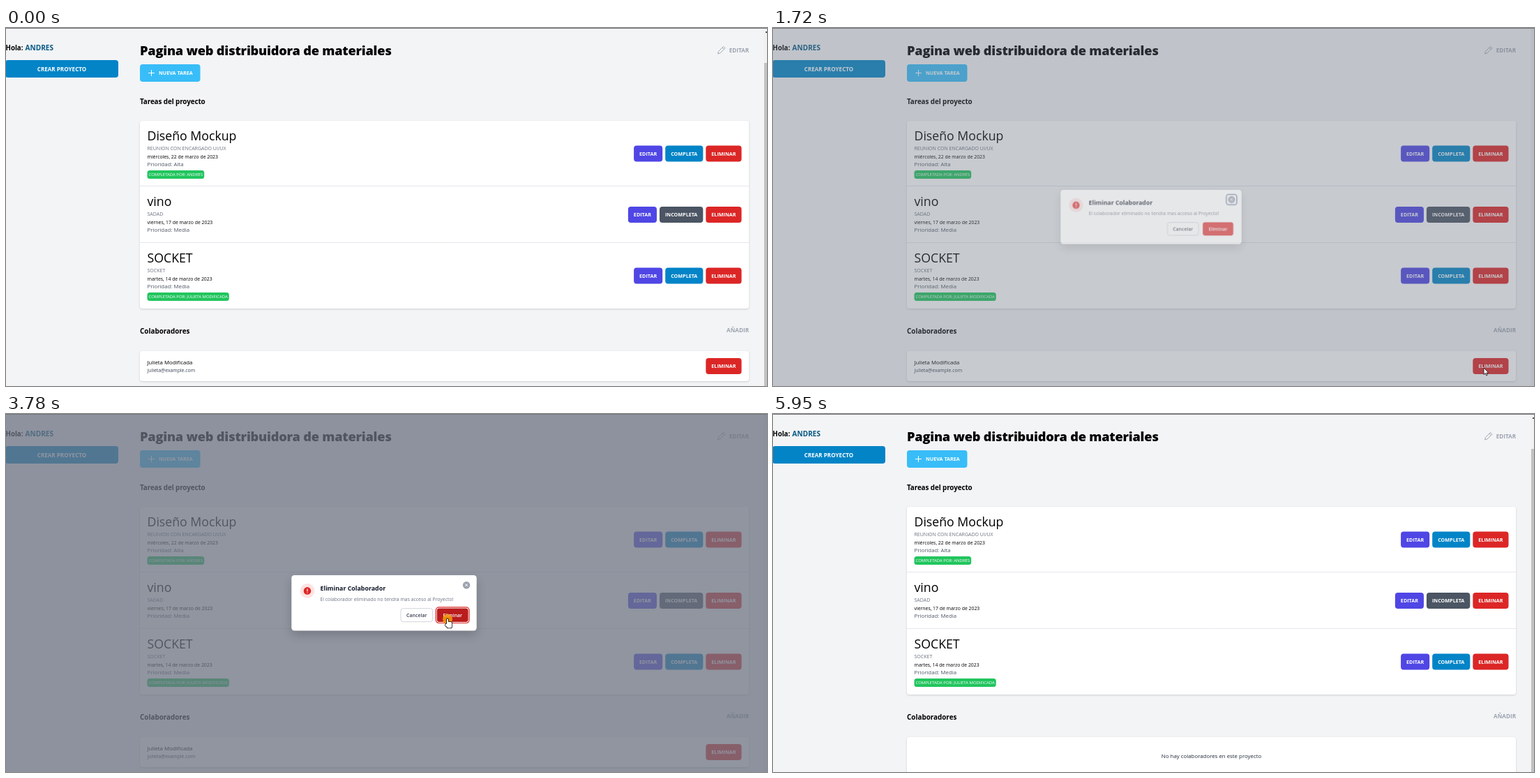
Recreate the animation shown at these times as an HTML page with a canvas. Size 1091x513 px, loop 6880 ms.

```html
<!DOCTYPE html>
<html lang="es">
<head>
<meta charset="utf-8">
<title>Tareas del proyecto</title>
<style>
  html, body { margin: 0; width: 100%; height: 100%; overflow: hidden; background: #f3f4f6; }
  canvas { display: block; }
</style>
</head>
<body>
<canvas id="stage" width="1091" height="513"></canvas>
<script>
const W = 1091, H = 513, LOOP = 6880;
const screen2d = document.getElementById('stage').getContext('2d');
const layer = document.createElement('canvas');
layer.width = W;
layer.height = H;
const layer2d = layer.getContext('2d');
let ctx = screen2d;

const RED = '#dc2626', SKY = '#0284c7', INDIGO = '#4f46e5', SLATE = '#4b5563';
const GREY = '#6b7280', PALE = '#9ca3af';
const LEFT = 192, RIGHT = 1065, INSET = 10.5;
const USER = 'ANDRES', PARTNER = 'Julieta Modificada', MAIL = 'julieta@example.com';

const TASKS = [
  { name: 'Diseño Mockup', detail: 'REUNION CON ENCARGADO UI/UX', date: 'miércoles, 22 de marzo de 2023', priority: 'Alta', doneBy: USER },
  { name: 'vino', detail: 'SADAD', date: 'viernes, 17 de marzo de 2023', priority: 'Media' },
  { name: 'SOCKET', detail: 'SOCKET', date: 'martes, 14 de marzo de 2023', priority: 'Media', doneBy: PARTNER.toUpperCase() }
];

// Moments of the story, in ms.
const ENTER = 130, LOCK = 1640, OPEN = 1645, PRESS = 3760, CLOSE = 4040, UNLOCK = 4150, LEAVE = 5930;

// The pointer glides to each stop and rests there until the next one.
const START = { x: 953, y: 356 };
const STOPS = [
  { from: ENTER, to: 450, x: 1049, y: 490 },
  { from: 450, to: 760, x: 980, y: 437 },
  { from: 830, to: 1180, x: 1019, y: 487 },
  { from: 1730, to: 2260, x: 764, y: 387 },
  { from: 2330, to: 2950, x: 645, y: 337 },
  { from: 3030, to: 3370, x: 633, y: 293 },
  { from: 3800, to: UNLOCK, x: 636, y: 296 },
  { from: 4640, to: 5320, x: 888, y: 458 },
  { from: 5380, to: LEAVE, x: 1078, y: 513 }
];

const snap = t => ENTER + Math.floor((t - ENTER) / 66) * 66;
const clamp = k => Math.max(0, Math.min(1, k));

// Cubic Bezier easing with control heights 0 and 1.
function ease(x, x1, x2) {
  if (x <= 0) return 0;
  if (x >= 1) return 1;
  let low = 0, high = 1, u = 0.5;
  for (let i = 0; i < 20; i++) {
    u = (low + high) / 2;
    const at = 3 * u * (1 - u) ** 2 * x1 + 3 * u * u * (1 - u) * x2 + u ** 3;
    if (at < x) low = u; else high = u;
  }
  return u * u * (3 - 2 * u);
}

function pointerAt(t) {
  return STOPS.reduce((p, stop) => {
    const k = 1 - (1 - clamp((t - stop.from) / (stop.to - stop.from))) ** 2.5;
    return { x: p.x + (stop.x - p.x) * k, y: p.y + (stop.y - p.y) * k };
  }, START);
}

const inside = (p, x, y, w, h) => p.x >= x && p.x <= x + w && p.y >= y && p.y <= y + h;

function setFont(size, weight, spacing = 0) {
  ctx.font = `${weight} ${size}px "Open Sans", "Noto Sans", sans-serif`;
  ctx.letterSpacing = `${spacing * size}px`;
}

function text(str, x, y, size, color, weight = 400, align = 'left', spacing = 0) {
  setFont(size, weight, spacing);
  ctx.textAlign = align;
  ctx.fillStyle = color;
  ctx.fillText(str, x, y);
}

function textWidth(str, size, weight) {
  setFont(size, weight);
  return ctx.measureText(str).width;
}

function box(x, y, w, h, r, fill, stroke, width = 1) {
  ctx.beginPath();
  ctx.roundRect(x, y, w, h, r);
  if (fill) { ctx.fillStyle = fill; ctx.fill(); }
  if (stroke) { ctx.strokeStyle = stroke; ctx.lineWidth = width; ctx.stroke(); }
}

function disc(x, y, r, fill) {
  box(x - r, y - r, 2 * r, 2 * r, r, fill);
}

function rect(x, y, w, h, fill) {
  ctx.fillStyle = fill;
  ctx.fillRect(x, y, w, h);
}

function line(x1, y1, x2, y2, color, width = 1) {
  ctx.beginPath();
  ctx.moveTo(x1, y1);
  ctx.lineTo(x2, y2);
  ctx.strokeStyle = color;
  ctx.lineWidth = width;
  ctx.stroke();
}

// Two crossed strokes: a plus, or a cross when turned by 45 degrees.
function cross(x, y, r, angle) {
  for (const a of [angle, angle + Math.PI / 2]) {
    const dx = r * Math.cos(a), dy = r * Math.sin(a);
    line(x - dx, y - dy, x + dx, y + dy, '#fff');
  }
}

function shadowed(blur, dy, color, draw) {
  ctx.save();
  ctx.shadowBlur = blur;
  ctx.shadowOffsetY = dy;
  ctx.shadowColor = color;
  draw();
  ctx.restore();
}

const card = (y, h) => shadowed(3, 1, 'rgba(0,0,0,.16)', () => box(LEFT, y, RIGHT - LEFT, h, 3.5, '#fff'));

// Lays buttons out from the right edge of a card; each is as wide as its label needs.
function buttonRow(middle, buttons) {
  let right = RIGHT - INSET;
  for (const [label, color] of buttons) {
    const w = textWidth(label, 7.2, 700) + 16;
    box(right - w, middle - 11.5, w, 23, 4, color);
    text(label, right - w / 2, middle + 2.6, 7.2, '#fff', 700, 'center');
    right -= w + 4;
  }
}

function drawTask(task, top, height) {
  const x = LEFT + INSET, base = top + 28;
  text(task.name, x, base, 17.7, '#000');
  text(task.detail, x, base + 13.6, 7.03, GREY);
  text(task.date, x, base + 25.5, 6.86, '#000');
  text('Prioridad: ' + task.priority, x, base + 37.3, 7.85, SLATE);
  if (task.doneBy) {
    const label = 'COMPLETADA POR: ' + task.doneBy;
    box(x, base + 43, textWidth(label, 5.96, 400) + 4, 12, 3.5, '#22c55e');
    text(label, x + 2, base + 51.2, 5.96, '#fff');
  }
  buttonRow(top + height / 2, [
    ['ELIMINAR', RED],
    task.doneBy ? ['COMPLETA', SKY] : ['INCOMPLETA', SLATE],
    ['EDITAR', INDIGO]
  ]);
}

function drawTasks() {
  let top = 133;
  card(top, 269);
  TASKS.forEach((task, i) => {
    const height = task.doneBy ? 94 : 81;
    if (i) line(LEFT, top - 0.5, RIGHT, top - 0.5, '#e5e7eb');
    drawTask(task, top, height);
    top += height;
  });
}

function drawPencil(x, y) {
  ctx.save();
  ctx.translate(x, y);
  ctx.rotate(-Math.PI / 4);
  ctx.strokeStyle = PALE;
  ctx.lineWidth = 0.9;
  ctx.stroke(new Path2D('M0 0L2.8 -1.7H13V1.7H2.8ZM10.6 -1.7V1.7'));
  ctx.restore();
}

function drawPage(removed, hover) {
  rect(0, 0, W, H, '#f3f4f6');
  text('Hola:', -0.5, 32.2, 9.7, '#000', 700);
  text(USER, 27.5, 32.2, 10.1, '#075985', 700);
  box(-1, 46, 162, 25, 4, SKY);
  text('CREAR PROYECTO', 80, 61.6, 8.1, '#fff', 700, 'center');

  text('Pagina web distribuidora de materiales', LEFT, 39.4, 18.2, '#000', 800, 'left', -0.012);
  box(LEFT, 52, 86.5, 25, 4, '#38bdf8');
  cross(208.5, 64.5, 4.4, 0);
  text('NUEVA TAREA', 219, 67.2, 7.17, '#fff', 700);
  drawPencil(1020.6, 36.8);
  text('EDITAR', RIGHT, 34.6, 8.15, PALE, 700, 'right');

  text('Tareas del proyecto', LEFT, 108.8, 9.9, '#000', 700, 'left', -0.01);
  drawTasks();

  text('Colaboradores', LEFT, 438, 9.9, '#000', 700);
  text('AÑADIR', RIGHT, 435.8, 8.15, PALE, 700, 'right');
  card(463, removed ? 60 : 43);
  if (removed) {
    text('No hay colaboradores en este proyecto', (LEFT + RIGHT) / 2, 492.8, 7.87, '#1f2937', 400, 'center');
  } else {
    text(PARTNER, LEFT + INSET, 482.4, 7.85, '#000');
    text(MAIL, LEFT + INSET, 493.4, 6.87, '#374151');
    buttonRow(484.5, [['ELIMINAR', hover ? '#991b1b' : RED]]);
  }
}

function drawDialog(hover, pressed) {
  ctx.clearRect(0, 0, W, H);
  shadowed(14, 6, 'rgba(0,0,0,.18)', () => box(409.3, 231, 265.4, 79.5, 4.2, '#fff'));
  disc(432, 253.4, 10.4, '#fee2e2');
  disc(432, 253.4, 5.3, RED);
  line(432, 250.4, 432, 254.2, '#fff', 1.2);
  line(432, 255.4, 432, 256.6, '#fff', 1.2);
  text('Eliminar Colaborador', 450.5, 253.2, 8.85, '#111827', 700);
  text('El colaborador eliminado no tendra mas acceso al Proyecto!', 450.5, 267.6, 6.88, GREY);

  if (!pressed) box(652.4, 237.6, 15.4, 15.2, 3.6, null, '#5f7096', 1.3);
  disc(660.1, 245.2, 5.2, PALE);
  cross(660.1, 245.2, 2.5, Math.PI / 4);

  box(566, 278.7, 45.6, 19, 3.2, '#fff', '#d1d5db');
  text('Cancelar', 588.8, 290.8, 7, '#374151', 600, 'center');
  if (pressed) box(616.3, 276.9, 47.8, 22.6, 4.4, '#fff', RED, 1.2);
  box(617.8, 278.4, 44.8, 19.6, 3.4, hover ? '#b91c1c' : RED);
  text('Eliminar', 640.2, 290.8, 6.9, '#fff', 600, 'center');
}

function drawScrollbar() {
  rect(1086, 1, 5, H, '#f1f1f1');
  rect(1087, 50, 4, H, '#c1c1c1');
  rect(1089, 5, 2, 2, '#505050');
}

function drawPointer(p, hand) {
  ctx.save();
  ctx.translate(p.x, p.y);
  if (hand) {
    const paint = (fill, stroke) => {
      box(-1, 0.4, 2, 9, 1, fill, stroke, 1.6);
      box(-3, 7.4, 5, 4, 1.6, fill, stroke, 1.6);
      box(-1, 5, 7.2, 8.4, 2, fill, stroke, 1.6);
    };
    paint(null, '#111');
    paint('#fff');
  } else {
    const arrow = new Path2D('M0 0V9.6L2.2 7.6 3.7 11 5.2 10.3 3.8 7.1 6.8 7Z');
    ctx.fillStyle = '#fff';
    ctx.fill(arrow);
    ctx.strokeStyle = '#111';
    ctx.lineWidth = 0.8;
    ctx.stroke(arrow);
  }
  ctx.restore();
}

function draw(now) {
  const t = snap(now % LOOP);
  const p = pointerAt(t);
  const pointerShown = t >= ENTER && t < LEAVE;
  const locked = t >= LOCK && t < UNLOCK;
  const shown = t > OPEN + 30;
  const open = shown ? ease((t - OPEN) / 300, 0, 0.2) * (1 - ease((t - CLOSE) / 200, 0.4, 1)) : 0;
  const overDelete = pointerShown && !shown && inside(p, 1003, 473, 51.5, 23);
  const overConfirm = open > 0 && inside(p, 617.8, 278.4, 44.8, 19.6);

  drawPage(t > CLOSE, overDelete);
  if (locked) rect(1086, 1, 5, H, '#e9eaee');

  if (open > 0) {
    rect(0, 0, W, H, `rgba(107,114,128,${0.75 * open ** 1.15})`);
    ctx = layer2d;
    drawDialog(overConfirm, t >= PRESS);
    ctx = screen2d;
    const scale = 0.95 + 0.05 * open;
    ctx.save();
    ctx.globalAlpha = open;
    ctx.translate(locked ? 542 : 537, 270.7);
    ctx.scale(scale, scale);
    ctx.drawImage(layer, -542, -270.7);
    ctx.restore();
  }

  if (!locked) drawScrollbar();
  rect(0, 0, W, 1, '#75777c');

  const clicked = [LOCK - 60, PRESS].some(at => t >= at && t < at + 60);
  if (clicked) disc(p.x, p.y + 1, 7, 'rgba(245,158,11,.85)');
  if (pointerShown) drawPointer(p, overConfirm);
}

const began = performance.now();
function tick() {
  draw(performance.now() - began);
  requestAnimationFrame(tick);
}
tick();
</script>
</body>
</html>
```
